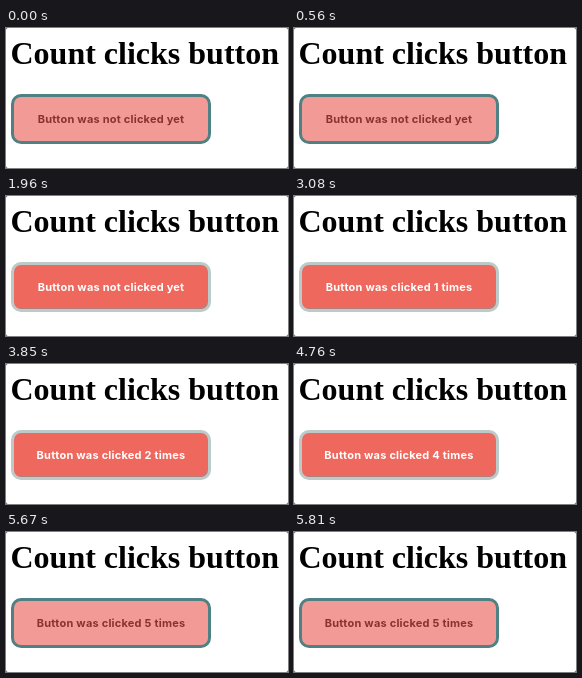
An HTML page that plays this animation: 282x140 px, repeating every 6300 ms.

```html
<!DOCTYPE html>
<html lang="en">
<head>
<meta charset="utf-8">
<title>Count clicks button</title>
<style>
  html, body { margin: 0; width: 100%; height: 100%; overflow: hidden; }
  html { background: #444; }
  body { position: relative; background: #fff; border-radius: 2px; }
  h1 {
    position: absolute; left: 4.5px; top: 7px; margin: 0;
    font: bold 32px/37px "Liberation Serif", serif; color: #000; white-space: nowrap;
  }
  .button {
    position: absolute; left: 5px; top: 66px; width: 200px; height: 50px;
    box-sizing: border-box; border: 3px solid #4f8083; border-radius: 10px;
    background: #f29b96; color: #8a322f;
    font: 700 11px/44px Inter, sans-serif; letter-spacing: .22px;
    text-align: center; white-space: nowrap;
    animation: hover 6300ms step-end infinite;
  }
  .label { position: absolute; inset: 0; visibility: hidden; }
  .label.on { visibility: visible; }
  @keyframes hover {
    0%, 90% { background: #f29b96; border-color: #4f8083; color: #8a322f; box-shadow: none; }
    31.11% {
      background: #ee685e; border-color: #bccaca; color: #fff;
      box-shadow: inset -1px -1px #b27f7a;
    }
  }
</style>
</head>
<body>
<h1>Count clicks button</h1>
<div class="button"></div>
<script>
  const LOOP = 6300;
  const clicks = [3010, 3850, 4200, 4550, 5180];
  const button = document.querySelector('.button');

  const labels = [0, ...clicks].map((_, n) => {
    const label = document.createElement('span');
    label.className = 'label';
    label.textContent = n ? `Button was clicked ${n} times` : 'Button was not clicked yet';
    return button.appendChild(label);
  });

  const hover = button.getAnimations()[0];

  function draw() {
    const t = performance.now() % LOOP;
    const count = clicks.filter(at => t >= at).length;
    labels.forEach((label, n) => label.classList.toggle('on', n === count));
    if (hover) hover.currentTime = t;
    requestAnimationFrame(draw);
  }
  draw();
</script>
</body>
</html>
```
